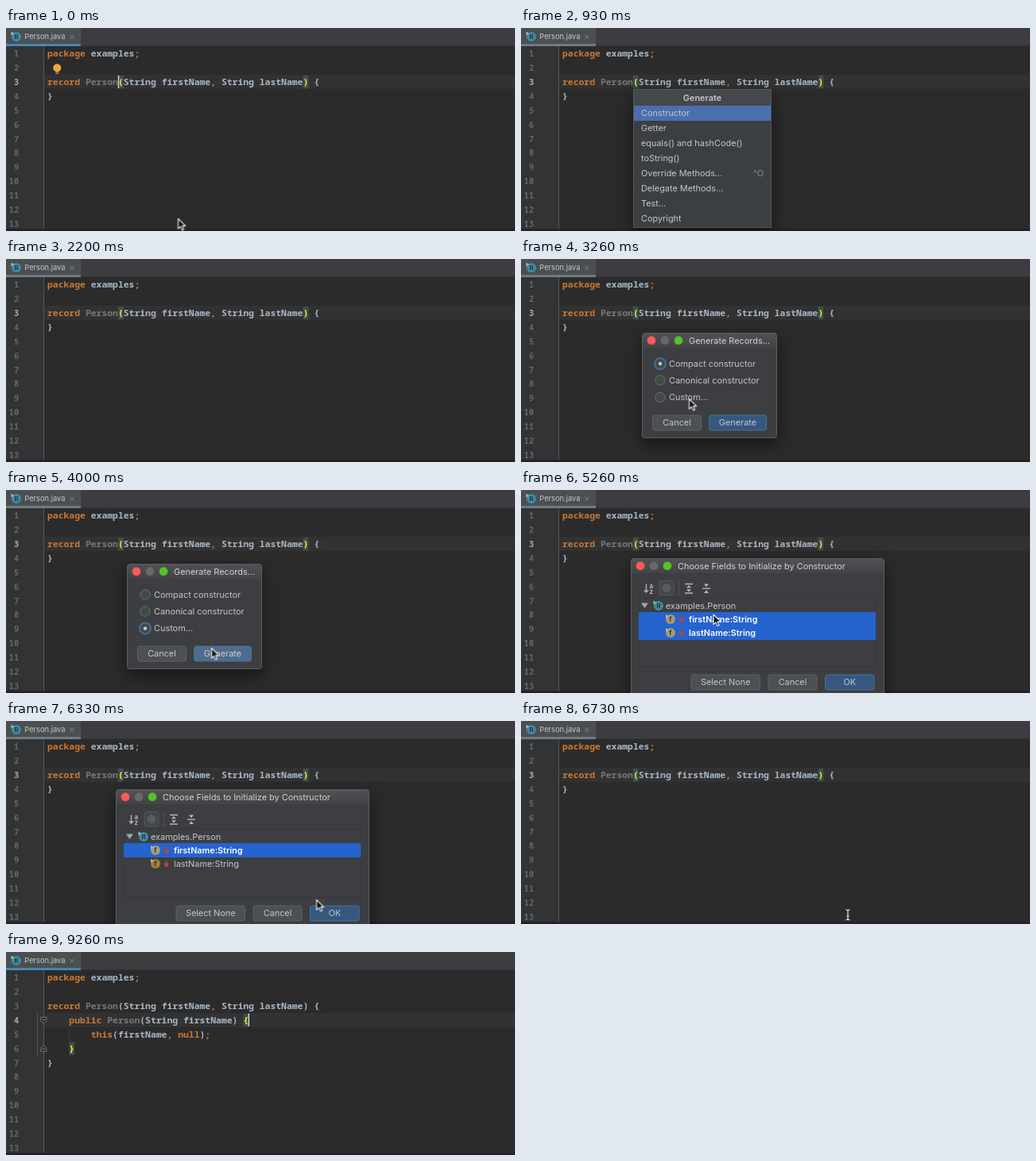
An HTML page for the animation above (9.73 s loop, 640 by 256 pixels).

```html
<!DOCTYPE html>
<html lang="en">
<head>
<meta charset="utf-8">
<title>Record constructor</title>
<style>
  html, body { margin: 0; width: 100%; height: 100%; overflow: hidden; background: #2b2b2b; }
  svg { display: block; width: 640px; height: 256px; }
  text { white-space: pre; }
  .ui { font-family: Inter, "Liberation Sans", sans-serif; }
  .code { font: 600 11.4px "Noto Sans Mono", "DejaVu Sans Mono", monospace; }
  .num { font: 600 10.4px "Noto Sans Mono", "DejaVu Sans Mono", monospace; }
  .shadow { filter: drop-shadow(0 8px 10px rgba(0, 0, 0, .5)); }
</style>
</head>
<body>
<svg id="stage" viewBox="0 0 640 256"></svg>
<script>
const LOOP = 9730;
const ADV = 6.84, LEFT = 52, STEP = 17.92;
const INK = { o: '#cc7832', w: '#a9b7c6', g: '#787878', y: '#ffef28' };
const mid = n => 32 + (n - 1) * STEP;

const rect = (x, y, w, h, fill, more = '') =>
  `<rect x="${x}" y="${y}" width="${w}" height="${h}" fill="${fill}" ${more}/>`;
const dot = (x, y, r, fill, more = '') =>
  `<circle cx="${x}" cy="${y}" r="${r}" fill="${fill}" ${more}/>`;
const line = (d, color, w = 1, more = '') =>
  `<path d="${d}" fill="none" stroke="${color}" stroke-width="${w}" ${more}/>`;
const fill = (d, color) => `<path d="${d}" fill="${color}"/>`;
const group = (id, body, more = '') => `<g id="${id}" ${more}>${body}</g>`;

// y is the middle of the text
const label = (x, y, str, { size = 10.9, color = '#c4c6c8', weight = 400, anchor = 'start' } = {}) =>
  `<text class="ui" x="${x}" y="${y + size * .36}" font-size="${size}" font-weight="${weight}" fill="${color}" text-anchor="${anchor}">${str}</text>`;

function code(n, col, ...parts) {
  let out = '';
  for (let i = 0; i < parts.length; i += 2) {
    const str = parts[i + 1];
    const lead = str.length - str.trimStart().length;
    out += `<text class="code" x="${LEFT + (col + lead) * ADV}" y="${mid(n) + 4}" fill="${INK[parts[i]]}">${str.trim()}</text>`;
    col += str.length;
  }
  return out;
}
const brace = (n, col, ch) =>
  rect(LEFT + col * ADV, mid(n) - 8, ADV, 16.5, '#3b514d') + code(n, col, 'y', ch);
const number = (n, color) =>
  `<text class="num" x="16.3" y="${mid(n) + 4}" text-anchor="end" fill="${color}">${n}</text>`;
const row = n => rect(48, mid(n) - 9, 592, 18, '#323232') + number(n, '#a4a3a3');
const caret = (id, x, n) => group(id, rect(x, mid(n) - 8, 1.4, 16, '#d8d8d8'));

const button = (x, y, w, str, main) =>
  rect(x + .5, y + .5, w - 1, 19, main ? '#365880' : '#4c5052',
    `rx="2.5" stroke="${main ? '#4c708c' : '#5e6060'}"`) +
  label(x + w / 2, y + 10, str, { anchor: 'middle' });

const frame = (x, y, w, h, title) =>
  rect(x + .5, y + .5, w - 1, h - 1, '#3c3e41', 'rx="3" stroke="#5c5d60"') +
  rect(x + 1, y + 1, w - 2, 18, 'url(#bar)') +
  ['#fc5b57', '#68676b', '#53c22b'].map((c, i) => dot(x + 12 + i * 17, y + 9.7, 5.4, c)).join('') +
  label(x + 59, y + 9.7, title, { color: '#d2d2d4' });

const radio = (y, on) => on
  ? dot(175, y, 7, '#43494a', 'stroke="#3d6c9e" stroke-width="2"') + dot(175, y, 2.2, '#c8c8c8')
  : dot(175, y, 6.2, '#43494a', 'stroke="#6b6f71"');

const recordIcon = (x, y) =>
  dot(x, y, 6, '#3d8ba4') +
  label(x, y, 'R', { size: 8, color: '#263238', weight: 600, anchor: 'middle' }) +
  fill(`M${x - 6.5} ${y - 6.5}l4 2.5-4 2.5z`, '#a9b4ba');

const field = (y, name, hot) =>
  (hot ? rect(148, y - 9, 298, 18, '#2563cf') : '') +
  dot(188, y, 6, hot ? '#a79a80' : '#a07f3c') +
  label(188, y, 'f', { size: 8.5, color: '#2e2a22', weight: 600, anchor: 'middle' }) +
  fill(`M182 ${y - 6}l4 2.5-4 2z`, '#b9b4aa') +
  rect(199, y - 1, 5, 4.6, '#b5452f') +
  line(`M200 ${y - 1}v-1.4a1.5 1.5 0 0 1 3 0v1.4`, '#b5452f') +
  label(211, y + .3, name + ':String', hot ? { color: '#fff', weight: 600, size: 10.8 } : {});

const menu = ['Constructor', 'Getter', 'equals() and hashCode()', 'toString()',
  'Override Methods...', 'Delegate Methods...', 'Test...', 'Copyright'];
const popup =
  rect(141.5, 77.5, 173, 174, '#3c3f41', 'stroke="#555759"') +
  rect(142, 78, 172, 20, '#45484a') +
  label(228, 88, 'Generate', { anchor: 'middle', weight: 600 }) +
  rect(142, 98, 172, 19, '#4b6eaf') +
  menu.map((s, i) => label(151, 107.5 + i * 19, s)).join('') +
  label(305, 183.5, '^O', { anchor: 'end', color: '#8c8c8c' });

const kindDialog =
  frame(152, 93, 170, 133, 'Generate Records...') +
  group('pickCompact', radio(132, 1) + radio(174.5, 0)) +
  group('pickCustom', radio(132, 0) + radio(174.5, 1)) +
  radio(153, 0) +
  label(186, 132, 'Compact constructor') +
  label(186, 153.2, 'Canonical constructor') +
  label(186, 174.5, 'Custom...') +
  button(165, 196.5, 62, 'Cancel') +
  button(236, 196.5, 73, 'Generate', true) +
  group('press', rect(237, 197.5, 71, 18, '#fff', 'rx="2" opacity=".12"'));

const sizer = (x, a, b) =>
  line(`M${x - 5} 118.5h10M${x - 5} 130h10`, '#b4b6b8', 1.3) + fill(a, '#b4b6b8') + fill(b, '#b4b6b8');
const fieldDialog =
  frame(138, 86, 319, 176, 'Choose Fields to Initialize by Constructor') +
  line('M157.5 118.5v10.5m-2.5-2.7l2.5 2.7 2.5-2.7', '#b4b6b8', 1.4) +
  label(161.5, 121, 'a', { size: 8, weight: 600 }) + label(161.5, 128, 'z', { size: 8, weight: 600 }) +
  rect(174, 114.5, 18, 18, '#434548', 'rx="3" stroke="#55585b"') + dot(183, 123.6, 5.6, '#585b5e') +
  line('M198.5 115v18', '#505355') +
  sizer(211, 'M208 123.3l3-3.3 3 3.3z', 'M208 125.3l3 3.3 3-3.3z') +
  line('M228 124.2h10', '#b4b6b8', 1.3) +
  fill('M230 118.5h6l-3 3.8zM230 130h6l-3-3.8z', '#b4b6b8') +
  rect(148.5, 136.5, 297, 86, '#3c3e41', 'stroke="#35373a"') +
  fill('M151 142.5h9l-4.5 6.5z', '#a2a5a7') +
  recordIcon(173, 146) +
  label(182, 146, 'examples.Person') +
  field(163, 'firstName', true) + field(180, 'lastName', false) +
  group('both', field(180, 'lastName', true)) +
  button(213.5, 232.5, 87.5, 'Select None') +
  button(310.5, 232.5, 62, 'Cancel') +
  button(382, 232.5, 62.5, 'OK', true);

const fold = (y, dir) =>
  `<path d="M43.8 ${y - 3.8 * dir}h7v${4.4 * dir}l-3.5 ${3.4 * dir}-3.5 ${-3.4 * dir}z" fill="#2b2b2b" stroke="#77797b"/>` +
  line(`M45.6 ${y - .6 * dir}h3.4`, '#8a8c8e');

const numbers = Array.from({ length: 13 }, (_, i) => number(i + 1, '#64676a')).join('');
const arrow = '<path d="M0 0V12.6L3 9.9 5 14.4 7.1 13.5 5.1 9.1H9.2Z" fill="#141414" stroke="#f4f4f4" stroke-width="1.1" stroke-linejoin="round"/>';

document.getElementById('stage').innerHTML =
  '<linearGradient id="bar" x2="0" y2="1"><stop stop-color="#505154"/><stop offset="1" stop-color="#424346"/></linearGradient>' +
  rect(0, 0, 640, 256, '#2b2b2b') +
  rect(0, 23, 47, 233, '#313335') +
  rect(0, 0, 640, 23, '#3d3c41') + rect(0, 22, 640, 1, '#323234') +
  rect(0, 0, 94, 23, '#4c4f52') +
  recordIcon(13, 11) +
  label(23.3, 11, 'Person.java', { size: 9.3 }) +
  line('M80.5 8.7l5 5m0-5l-5 5', '#808284') +
  rect(0, 20, 94, 3, '#6f7a82') +
  group('focus', rect(0, 20, 94, 3, '#4288b2')) +
  numbers +
  group('row3', row(3)) + group('row4', row(4)) +
  line('M47.5 23v233', '#555759') +
  code(1, 0, 'o', 'package', 'w', ' examples', 'o', ';') +
  code(3, 0, 'o', 'record', 'g', ' Person', 'w', '(String', 'w', ' firstName', 'o', ',',
    'w', ' String', 'w', ' lastName)', 'w', ' {') +
  group('before', brace(3, 13, '(') + brace(3, 47, ')') + code(4, 0, 'w', '}')) +
  group('after',
    line('M39.5 77v54', '#55585a') + line('M80 96v17', '#3b3d3e') +
    code(4, 4, 'o', 'public', 'g', ' Person', 'w', '(String', 'w', ' firstName)', 'w', ' {') +
    code(5, 8, 'o', 'this', 'w', '(firstName', 'o', ',', 'o', ' null', 'w', ')', 'o', ';') +
    code(6, 4, 'w', '}') + code(7, 0, 'w', '}')) +
  group('match', brace(4, 36, '{') + brace(6, 4, '}')) +
  group('folds', fold(86, 1) + fold(121.5, -1)) +
  group('bulb', dot(64.3, 50.3, 5, '#f2a83c') + rect(62.2, 54.5, 4.2, 1.4, '#d0923a') + rect(62.2, 56.6, 4.2, 1.2, '#a5a7a9')) +
  caret('caretA', 140.8, 3) + caret('caretB', 304.6, 4) +
  rect(0, 253.5, 640, 2.5, '#271e23') +
  group('popup', popup, 'class="shadow"') +
  group('kind', kindDialog, 'class="shadow"') +
  group('fields', fieldDialog, 'class="shadow"') +
  group('pointer', group('arrow', arrow)) +
  group('beam', line('M408.3 238.2q2.7 0 2.7 1.6v9.4q0 1.6-2.7 1.6M413.7 238.2q-2.7 0-2.7 1.6v9.4q0 1.6 2.7 1.6M409.4 245.8h3.2', '#d8d8d8', 1.3));

const play = (id, frames) =>
  document.getElementById(id).animate(frames, { duration: LOOP, iterations: Infinity });

// Starts on or off, then flips at each time
function show(id, on, ...times) {
  const frames = [0, ...times].map((t, i) => ({
    offset: t / LOOP, opacity: i % 2 ? 1 - on : on, easing: 'step-end'
  }));
  play(id, [...frames, { ...frames[frames.length - 1], offset: 1 }]);
}

show('focus', 1, 930, 6800);
show('bulb', 1, 800);
show('caretA', 1, 400);
show('popup', 0, 860, 2200);
show('kind', 0, 2260, 4060);
show('pickCompact', 1, 3330);
show('pickCustom', 0, 3330);
show('press', 0, 4000, 4060);
show('fields', 0, 4130, 6660);
show('both', 1, 5400);
show('before', 1, 6800);
show('row3', 1, 6800);
show('after', 0, 6800);
show('row4', 0, 6800);
show('match', 0, 7060);
show('folds', 0, 7130);
show('caretB', 0, 6800, 7800, 8260, 8800, 9260);
show('arrow', 1, 130, 2860, 6730);
show('beam', 0, 6730, 7060);

// Pointer stops: time, x, y, steps towards the next stop
const stops = [
  [0, 216.5, 240.5, 1],
  [2860, 218, 105, 2], [2993, 216, 127, 4], [3260, 211.5, 176.5, 1],
  [3533, 211.5, 176.5, 2], [3666, 223, 182, 4], [3930, 258.5, 199.5, 1],
  [4667, 258.5, 199.5, 3], [4865, 254, 187, 6], [5260, 242, 157, 1],
  [5933, 242, 157, 2], [6066, 278, 174, 4], [6330, 390.5, 225.5, 4],
  [6600, 411, 240, 1], [LOOP, 411, 240, 1]
];
play('pointer', stops.map(([t, x, y, n]) => ({
  offset: t / LOOP, transform: `translate(${x}px, ${y}px)`, easing: `steps(${n})`
})));
</script>
</body>
</html>
```
